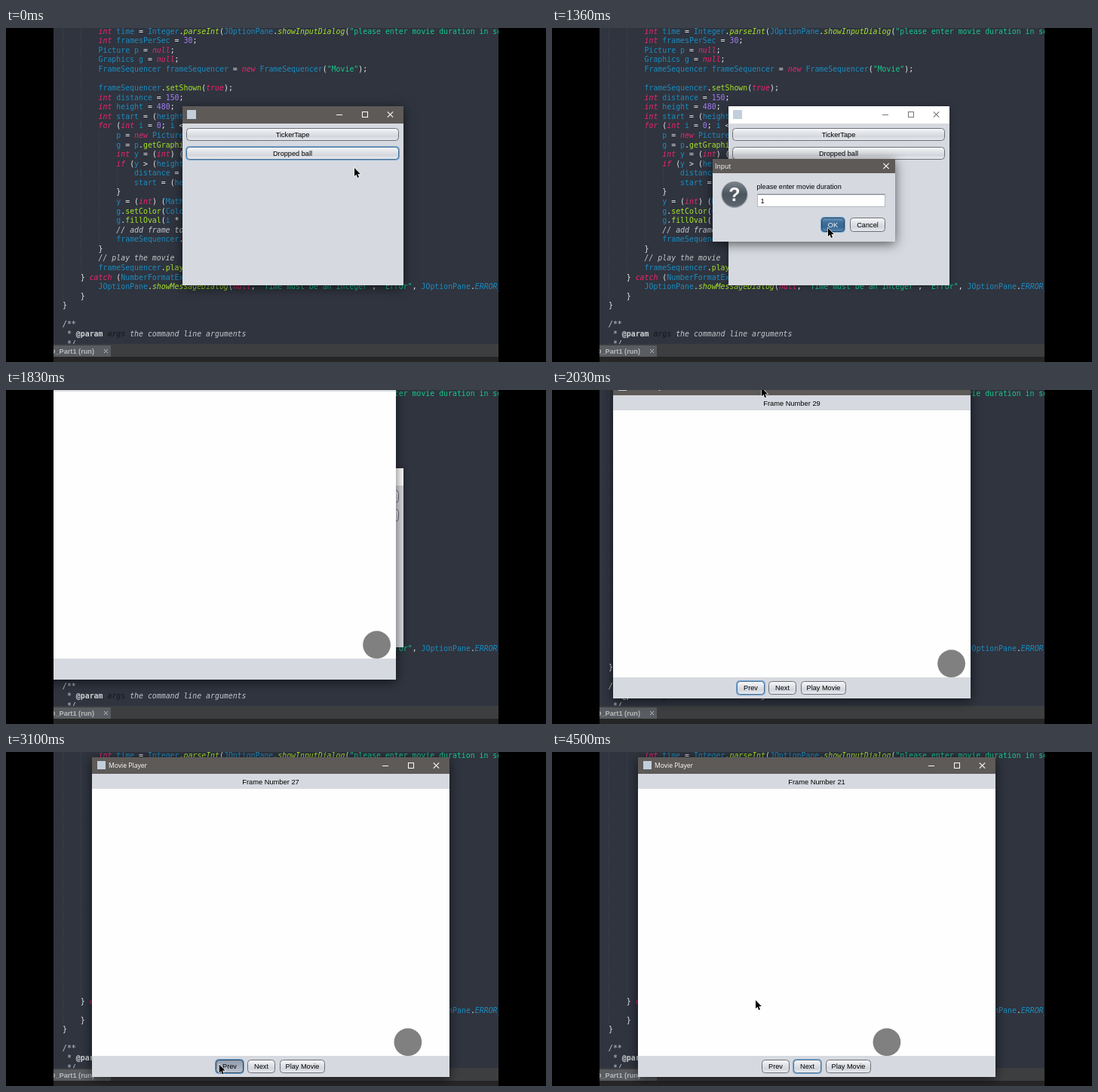
These frames come from a looping animation (716x444 px, 4.6 s). An HTML page with a canvas:

```html
<!DOCTYPE html>
<html lang="en">
<head>
<meta charset="utf-8">
<title>Dropped ball</title>
<style>
html, body { margin: 0; width: 100%; height: 100%; overflow: hidden; background: #000; }
canvas { display: block; }
</style>
</head>
<body>
<canvas id="stage" width="716" height="444"></canvas>
<script>
const W = 716, H = 444, LOOP = 4600;
const stage = document.getElementById('stage').getContext('2d');
let ctx = stage;

const UI = '"Liberation Sans", Arial, sans-serif';
const CAPTION = '"Open Sans", sans-serif';
const MONO = '"DejaVu Sans Mono", monospace';
const PANEL = '#d6d9df', TITLE = '#5d5a58';
const CELL = 5.944, LINE = 12.57;

const CODE = `        int time = Integer.parseInt(JOptionPane.showInputDialog("please enter movie duration in seconds
        int framesPerSec = 30;
        Picture p = null;
        Graphics g = null;
        FrameSequencer frameSequencer = new FrameSequencer("Movie");

        frameSequencer.setShown(true);
        int distance = 150;
        int height = 480;
        int start = (height - distance);
        for (int i = 0; i < time; i++) {
            p = new Picture(640, 480);
            g = p.getGraphics();
            int y = (int) (start + i);
            if (y > (height - 50)) {
                distance = distance / 2;
                start = (height - distance);
            }
            y = (int) (Math.abs(y));
            g.setColor(Color.GRAY);
            g.fillOval(i * 20, y, 50, 50);
            // add frame to sequencer
            frameSequencer.addFrame(p);
        }
        // play the movie
        frameSequencer.play(framesPerSec);
    } catch (NumberFormatException e) {
        JOptionPane.showMessageDialog(null, "Time must be an integer", "Error", JOptionPane.ERROR_MESSAGE
    }
}

/**
 * @param args the command line arguments
 */`.split('\n');

const clamp = v => Math.max(0, Math.min(1, v));
const smooth = v => { v = clamp(v); return v * v * (3 - 2 * v); };
const ramp = (t, a, b) => clamp((t - a) / (b - a));
const within = (t, a, b) => t >= a && t < b;

function rect(x, y, w, h, fill) {
  ctx.fillStyle = fill;
  ctx.fillRect(x, y, w, h);
}

function round(x, y, w, h, r) {
  ctx.beginPath();
  ctx.roundRect(x, y, w, h, r);
}

function disc(x, y, r, fill) {
  ctx.beginPath();
  ctx.arc(x, y, r, 0, 7);
  ctx.fillStyle = fill;
  ctx.fill();
}

function shade(y, h, ...colors) {
  const g = ctx.createLinearGradient(0, y, 0, y + h);
  colors.forEach((c, i) => g.addColorStop(i / (colors.length - 1), c));
  return g;
}

function text(str, x, y, color, font, align = 'left') {
  ctx.font = font;
  ctx.fillStyle = color;
  ctx.textAlign = align;
  ctx.fillText(str, x, y);
}

function lines(color, width, ...paths) {
  ctx.strokeStyle = color;
  ctx.lineWidth = width;
  ctx.beginPath();
  for (const [x1, y1, x2, y2] of paths) {
    ctx.moveTo(x1, y1);
    ctx.lineTo(x2, y2);
  }
  ctx.stroke();
}

// --- editor ---

function codeLine(line, y) {
  const put = (str, col, color, style = '') =>
    text(str, 75 + col * CELL, y, color, `${style} 9.87px ${MONO}`);
  const indent = line.search(/\S/);
  if (indent < 0) return;
  if (line.includes('@param')) {
    put(' *', 0, '#c4c8cc', 'italic');
    put('@param', 3, '#d0d3d6', 'bold');
    put('args', 10, '#14171d', 'italic');
    put('the command line arguments', 15, '#c4c8cc', 'italic');
    return;
  }
  if (/^\s*(\/|\*)/.test(line)) return put(line.trim(), indent, '#c4c8cc', 'italic');
  for (const m of line.matchAll(/"[^"]*"?|\w+|[^\s\w"]/g)) {
    const word = m[0], before = line.slice(0, m.index), after = line[m.index + word.length];
    if (word[0] === '"') put(word, m.index, '#17c68b');
    else if (/^(int|new|null|true|for|if|catch)$/.test(word)) put(word, m.index, '#f0246c', 'italic');
    else if (/^\d/.test(word)) put(word, m.index, '#a47cf0');
    else if (/^\w/.test(word)) {
      const isStatic = /\b[A-Z]\w*\.$/.test(before);
      const isMethod = after === '(' && before.endsWith('.');
      put(word, m.index, isMethod ? '#a7e32a' : '#1a8cc0', isStatic ? 'italic' : '');
    } else put(word, m.index, '#e6e8ea');
  }
}

function drawEditor() {
  rect(0, 0, W, H, '#000');
  rect(63, 0, 590, H, '#2f343f');
  ctx.setLineDash([1, 2]);
  lines('rgba(255,255,255,.1)', 1, [75.5, 0, 75.5, 362], [99.5, 0, 99.5, 325],
    [123.5, 136, 123.5, 288], [147.5, 186, 147.5, 212]);
  ctx.setLineDash([]);
  CODE.forEach((line, i) => codeLine(line, 7.7 + i * LINE));
  rect(63, 420, 590, 18, '#3d3e40');
  rect(63, 422, 76, 16, '#595c60');
  rect(63, 437, 590, 7, '#262626');
  text('D_Part1 (run)', 117, 433, '#b8babc', `bold 9.2px ${UI}`, 'right');
  lines('#c0c2c4', 1, [130, 427, 135, 432], [135, 427, 130, 432]);
  rect(0, 0, 63, H, '#000');
  rect(653, 0, 63, H, '#000');
}

// --- widgets ---

function frame(x, y, w, h, active) {
  ctx.save();
  ctx.shadowColor = `rgba(0,0,0,${active ? .6 : .35})`;
  ctx.shadowBlur = active ? 14 : 8;
  ctx.shadowOffsetY = active ? 3 : 1;
  rect(x, y, w, h, PANEL);
  ctx.restore();
}

function titleBar(x, y, w, h, active) {
  rect(x, y, w, h, active ? TITLE : '#fff');
}

function cross(x, y, r, color) {
  lines(color, 1.1, [x - r, y - r, x + r, y + r], [x + r, y - r, x - r, y + r]);
}

function windowControls(right, y, active) {
  const color = active ? '#fff' : '#777';
  lines(color, 1, [right - 89, y + .5, right - 81, y + .5]);
  ctx.strokeRect(right - 54.5, y - 3.5, 7, 7);
  cross(right - 17.5, y, 3.7, color);
}

function button(x, y, w, h, label, { focus, pressed, primary, dark } = {}) {
  if (focus) {
    round(x - 1, y - 1, w + 2, h + 2, 5);
    ctx.fillStyle = '#73a4d1';
    ctx.fill();
  }
  round(x + .5, y + .5, w - 1, h - 1, 4);
  ctx.fillStyle = dark ? shade(y, h, '#6f97bb', '#3f6f9b', '#356591', '#6490b5')
    : pressed ? shade(y, h, '#8f9bac', '#a3adbb', '#bcc4cf')
    : primary ? shade(y, h, '#d4e0ec', '#9ab4cd', '#88a6c3', '#bcd3e6')
    : shade(y, h, '#fbfbfc', '#e4e6ea', '#d3d6dc', '#eceef2');
  ctx.fill();
  ctx.strokeStyle = dark || pressed ? '#24435f' : focus ? '#4f7393' : '#6c7077';
  ctx.lineWidth = 1;
  ctx.stroke();
  text(label, x + w / 2, y + h / 2 + 3.3, dark ? '#fff' : '#000', `9.2px ${UI}`, 'center');
}

// --- windows ---

function drawLauncher(active, focus, pressed) {
  frame(234, 104, 293, 238, active);
  titleBar(234, 104, 293, 23, active);
  rect(240, 109, 12, 12, '#c3cedb');
  windowControls(527, 115, active);
  button(239, 133, 282, 17, 'TickerTape');
  button(239, 158, 282, 17, 'Dropped ball', { focus, pressed });
}

function drawDialog(t) {
  frame(213, 174, 242, 110, true);
  titleBar(213, 174, 242, 19, true);
  text('Input', 216, 186.8, '#fff', `8.6px ${CAPTION}`);
  cross(443, 183.5, 3.7, '#fff');
  disc(242, 221.5, 17.5, '#8d949c');
  disc(242, 221, 16.5, shade(204, 34, '#7c858e', '#4c555e', '#5d6770'));
  text('?', 242, 230, '#fff', `bold 25px ${UI}`, 'center');
  text('please enter movie duration', 271.5, 214, '#000', `9.1px ${UI}`);
  rect(272, 220, 170, 18, t < 1260 ? '#9fb9d1' : '#b4bac3');
  rect(273, 221, 168, 16, '#fff');
  lines('#8d9299', 1, [273, 221.5, 441, 221.5]);
  if (t >= 1000) text('1', 276.5, 232.5, '#000', `9.2px ${UI}`);
  if (t < 1000) rect(277, 223, 1, 12, '#222');
  const clicked = t >= 1280;
  button(357, 252, 31, 19, 'OK', { primary: true, dark: clicked, focus: clicked });
  button(395, 252, 47, 19, 'Cancel');
}

const layer = document.createElement('canvas');
layer.width = W;
layer.height = H;

function fadeDialog(t) {
  const shown = t < 1000 ? ramp(t, 440, 540) : 1 - ramp(t, 1430, 1510);
  if (!shown) return;
  ctx = layer.getContext('2d');
  ctx.clearRect(0, 0, W, H);
  drawDialog(t);
  ctx = stage;
  const scale = .93 + .07 * shown;
  ctx.save();
  ctx.globalAlpha = shown;
  ctx.translate(334, 229);
  ctx.scale(scale, scale);
  ctx.drawImage(layer, -334, -229);
  ctx.restore();
}

const PREV = [2860, 2980, 3110, 3240, 3400, 3520, 3650, 3770, 3930, 4030];
const NEXT = [4250, 4370];
const count = (times, t) => times.filter(at => t >= at).length;
const held = (times, t) => times.some(at => within(t, at - 60, at));

function drawPlayer(t) {
  const drag = 1 - smooth(ramp(t, 1900, 2150));
  const index = 29 - count(PREV, t) + count(NEXT, t);
  const onNext = t >= NEXT[0] - 60;
  ctx.save();
  ctx.translate(Math.round(-71 * drag), Math.round(-47 * drag));
  frame(114, 7, 474, 425, true);
  titleBar(114, 7, 474, 22, true);
  rect(121, 12, 11, 11, '#c3cedb');
  text('Movie Player', 136, 21.3, '#fff', `8.6px ${CAPTION}`);
  windowControls(588, 18, true);
  text('Frame Number ' + index, 351, 43, '#000', `9.3px ${UI}`, 'center');
  if (t >= 1790) {
    rect(114, 49, 474, 355, '#fefefe');
    disc(132.5 + 14.83 * index, 385.7, 18.4, '#808080');
  }
  if (t >= 1865) {
    button(278, 409, 37, 18, 'Prev', { focus: !onNext, pressed: held(PREV, t) });
    button(320, 409, 37, 18, 'Next', { focus: onNext, pressed: held(NEXT, t) });
    button(363, 409, 60, 18, 'Play Movie');
  }
  ctx.restore();
}

// --- pointer ---

const PATH = [
  [0, 462, 186], [160, 462, 186], [400, 433, 171], [560, 433, 171], [660, 418, 196],
  [730, 418, 196], [1230, 366, 266], [1430, 366, 266], [1600, 250, 40], [1760, 250, 40],
  [1820, 240, -28], [1900, 240, -28], [2150, 311, 19], [2290, 315, 70], [2460, 318, 211],
  [2500, 318, 211], [2740, 285, 412], [2830, 285, 412], [3330, 281, 418], [3590, 279, 420],
  [3640, 279, 420], [3900, 282, 421], [4040, 284, 424], [4190, 345, 420], [4400, 349, 415],
  [4430, 349, 415], [4500, 270, 330], [LOOP, 270, 330]
];

function drawPointer(t) {
  const i = PATH.findIndex(p => p[0] > t);
  const [ta, xa, ya] = PATH[i - 1], [tb, xb, yb] = PATH[i];
  const k = smooth((t - ta) / (tb - ta));
  ctx.save();
  ctx.translate(xa + (xb - xa) * k, ya + (yb - ya) * k);
  ctx.beginPath();
  for (const [x, y] of [[0, 0], [0, 11], [2.5, 8.8], [4.2, 13], [6, 12.2], [4.3, 8.2], [7.8, 8]]) ctx.lineTo(x, y);
  ctx.closePath();
  ctx.strokeStyle = '#fff';
  ctx.lineWidth = 1.2;
  ctx.stroke();
  ctx.fillStyle = '#000';
  ctx.fill();
  ctx.restore();
}

const backdrop = document.createElement('canvas');
backdrop.width = W;
backdrop.height = H;
ctx = backdrop.getContext('2d');
drawEditor();
ctx = stage;

function draw(now) {
  const t = now % LOOP;
  ctx.drawImage(backdrop, 0, 0);
  ctx.save();
  ctx.beginPath();
  ctx.rect(63, 0, 590, H);
  ctx.clip();
  drawLauncher(t < 440 || within(t, 1480, 1550), t < 440, within(t, 390, 440));
  fadeDialog(t);
  if (within(t, 1550, 1760)) frame(43, -40, 160, 70, true);
  if (t >= 1760) drawPlayer(t);
  drawPointer(t);
  ctx.restore();
}

const start = performance.now();
function tick() {
  draw(performance.now() - start);
  requestAnimationFrame(tick);
}
tick();
</script>
</body>
</html>
```
